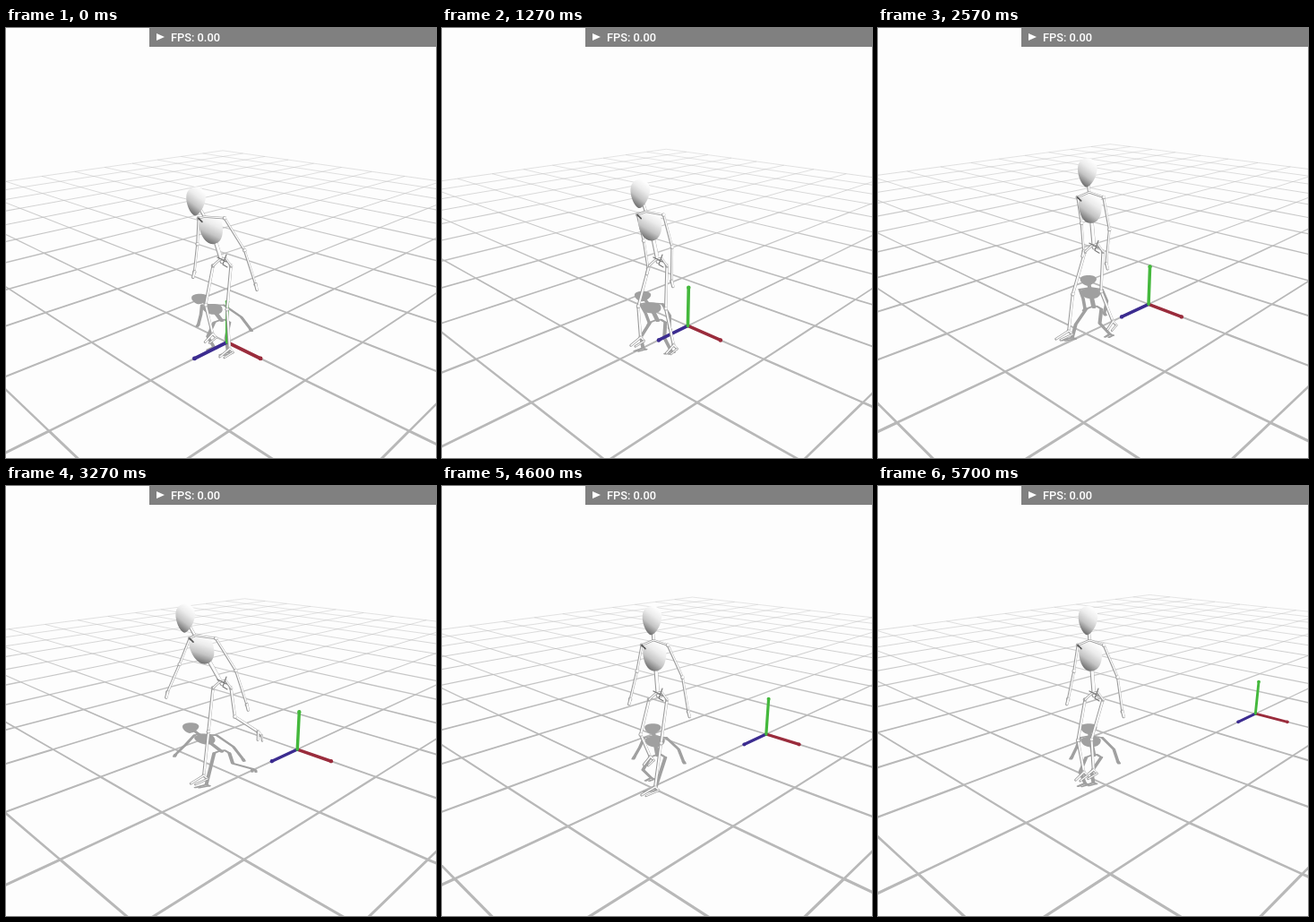
An HTML page with a canvas for the animation above (5730 ms loop, 480 by 480 pixels).

```html
<!DOCTYPE html>
<html lang="en">
<head>
<meta charset="utf-8">
<title>Walking skeleton viewer</title>
<style>
  html, body { margin: 0; width: 100%; height: 100%; overflow: hidden; background: #fdfdfd; }
  canvas { display: block; position: absolute; left: 0; top: 0; }
  .bar {
    position: absolute; left: 160px; top: 0; width: 320px; height: 20.5px;
    background: #808080; color: #fff;
    font: 500 12.8px/21px Roboto, "Open Sans", sans-serif;
  }
  .bar span { position: absolute; left: 24px; white-space: pre; }
  .bar i {
    position: absolute; left: 8px; top: 6px;
    border: solid transparent; border-width: 4.5px 0 4.5px 9px; border-left-color: #fff;
  }
</style>
</head>
<body>
<canvas id="view" width="480" height="480"></canvas>
<div class="bar"><i></i><span>FPS: 0.00</span></div>
<script>
const ctx = document.getElementById('view').getContext('2d');
const LOOP = 5730, MID = 240, FOCAL = 579.4;
const PITCH = Math.atan(0.327), SIN = Math.sin(PITCH), COS = Math.cos(PITCH);
const AXIS = 0.46, HALF = 10, STRIDE = 1.7, CONTACT = 5.82;

// Camera path over the floor while it follows the walker: seconds, x, z.
const PATH = [
  [0, 3.37, 3.46], [0.77, 3.36, 3.83], [1.77, 3.51, 4.01], [3.27, 3.29, 4.54],
  [4.03, 3.27, 4.6], [5.17, 3.31, 5.82], [5.7, 3.2, 6.38]
];

const lerp = (a, b, k) => a + (b - a) * k;
const ramp = (t, from, to) => {
  const k = Math.max(0, Math.min(1, (t - from) / (to - from)));
  return k * k * (3 - 2 * k);
};
const bump = (t, center, width) => Math.exp(-(((t - center) / width) ** 2));
const point = (x, y) => ({ x, y });
const shift = (p, x, y) => point(p.x + x, p.y + y);
const mix = (a, b, k) => point(lerp(a.x, b.x, k), lerp(a.y, b.y, k));

const rise = t => ramp(t, 1.8, 3.2);

function cameraAt(t) {
  let i = 1;
  while (i < PATH.length - 1 && t > PATH[i][0]) i++;
  const [t0, x0, z0] = PATH[i - 1], [t1, x1, z1] = PATH[i];
  const k = Math.min(1, (t - t0) / (t1 - t0));
  return { x: lerp(x0, x1, k), z: lerp(z0, z1, k), height: lerp(2.67, 2.4, rise(t)) };
}

function makeProjector(cam) {
  return (x, y, z) => {
    const dx = x - cam.x, dz = z - cam.z, dy = y - cam.height;
    const right = (dx - dz) * Math.SQRT1_2, ahead = -(dx + dz) * Math.SQRT1_2;
    const d = ahead * COS - dy * SIN, up = ahead * SIN + dy * COS;
    return { x: MID + FOCAL * right / d, y: MID - FOCAL * up / d, d };
  };
}

function line(points, color, width) {
  ctx.strokeStyle = color;
  ctx.lineWidth = width;
  ctx.beginPath();
  for (const p of points) ctx.lineTo(p.x, p.y);
  ctx.stroke();
}

function dot(p, radius, color) {
  ctx.fillStyle = color;
  ctx.beginPath();
  ctx.arc(p.x, p.y, radius, 0, 7);
  ctx.fill();
}

function drawGrid(project) {
  ctx.lineCap = 'butt';
  const segment = (a, b) => {
    if (a.d < 1 || b.d < 1) return;
    const d = (a.d + b.d) / 2;
    ctx.globalAlpha = Math.max(0.4, Math.min(1, 7 / d));
    line([a, b], '#b8b8b8', Math.max(0.9, 0.019 * FOCAL / d));
  };
  for (let i = -HALF; i <= HALF; i++)
    for (let j = -HALF; j < HALF; j++) {
      segment(project(i, 0, j), project(i, 0, j + 1));
      segment(project(j, 0, i), project(j + 1, 0, i));
    }
  ctx.globalAlpha = 1;
}

function drawAxes(project) {
  const origin = project(0, 0, 0), width = 0.036 * FOCAL / origin.d;
  const bar = (x, y, z, color) => {
    const tip = project(x * AXIS, y * AXIS, z * AXIS);
    line([origin, tip], color, width);
    dot(tip, width * 0.62, color);
  };
  ctx.lineCap = 'round';
  bar(1, 0, 0, '#9a2c3c');
  bar(0, 0, 1, '#3c2c90');
  bar(0, 1, 0, '#44b83c');
}

// The walk is driven by distance covered; a stoop and a lunge are laid over it.
function getPose(t, walked) {
  const late = rise(t), stoop = 1 - ramp(t, 0.8, 1.8), lunge = bump(t, 3.27, 0.35);
  const phase = 2 * Math.PI * (walked - CONTACT) / STRIDE;
  const reach = lerp(0.08, 0.24, late), swing = Math.cos(phase);
  const lean = 0.08 + 0.23 * stoop + 0.43 * lunge;
  const above = (p, length, angle) =>
    shift(p, -length * Math.sin(angle), -length * Math.cos(angle));

  const pelvis = point(241, lerp(261, 234, late) - 13 * lunge);
  const rib = above(pelvis, 44 - 6 * stoop, lean);
  const head = above(rib, 40 - 4 * stoop, lean + 0.2 * stoop);
  const ground = point(lerp(240, 235, late), lerp(352, 327, late));

  const leg = side => {
    const step = -side * reach * swing;
    const lift = Math.max(0, side * Math.sin(phase)) * reach;
    const kick = side > 0 ? lunge : 0;
    const hip = shift(pelvis, 10 * side, 4.5);
    const ankle = shift(ground,
      14 * side - 75 * step + 32 * kick, 4 * side + 33 * step - 85 * lift - 36 * kick);
    const half = Math.hypot(ankle.x - hip.x, ankle.y - hip.y) / 2;
    const bend = 0.4 * Math.sqrt(Math.max(0, 48 * 48 - half * half));
    const knee = shift(mix(hip, ankle, 0.5), -0.7 * bend, 0.5 * bend);
    const toe = shift(ankle, -12 + 0.45 * (ankle.x - knee.x), 9);
    return { hip, knee, ankle, toe };
  };
  const arm = side => {
    const shoulder = shift(rib, 14.5 * side, -12.5);
    const wrist = shift(shoulder,
      5 + 9 * side - 14 * side * swing + 21 * side * lunge + 10 * stoop, 67 + 7 * side);
    const elbow = shift(mix(shoulder, wrist, 0.5), 3 + 2 * side, -1);
    return { shoulder, elbow, wrist, side };
  };
  return {
    head, rib, pelvis, lean, floor: ground.y + 12,
    legs: [leg(1), leg(-1)], farArm: arm(-1), nearArm: arm(1)
  };
}

function egg(p, w, h, angle, blunt, shadow) {
  ctx.save();
  ctx.translate(p.x, p.y);
  ctx.rotate(angle);
  ctx.beginPath();
  ctx.moveTo(-w, -h * 0.3);
  ctx.bezierCurveTo(-w, -h * 1.25, w, -h * 1.25, w, -h * 0.3);
  ctx.bezierCurveTo(w, h * 0.35, w * blunt, h, 0, h);
  ctx.bezierCurveTo(-w * blunt, h, -w, h * 0.35, -w, -h * 0.3);
  const shade = ctx.createLinearGradient(-w * 0.9, h * 0.6, w * 0.5, -h * 0.8);
  shade.addColorStop(0, '#707070');
  shade.addColorStop(0.35, '#c4c4c4');
  shade.addColorStop(0.7, '#ececec');
  shade.addColorStop(1, '#fdfdfd');
  ctx.fillStyle = shadow || shade;
  ctx.fill();
  ctx.restore();
}

function drawBody(pose, shadow) {
  const { head, rib, pelvis, lean, farArm, nearArm } = pose;
  const bone = (width, ...points) => {
    line(points, shadow || '#999', shadow ? width + 1.5 : width);
    if (!shadow) line(points.map(q => shift(q, 0.4, -0.2)), '#fbfbfb', width - 1.3);
  };
  const limb = (width, ...points) => {
    bone(width, ...points);
    if (!shadow) for (const q of points) {
      dot(q, 2.2, '#a4a4a4');
      dot(shift(q, 0.5, -0.3), 1.6, '#fbfbfb');
    }
  };
  const drawArm = ({ shoulder, elbow, wrist, side }) => {
    limb(2.8, shoulder, elbow, wrist);
    bone(3.4, wrist, shift(wrist, 1.5 * side, 6));
  };
  const neck = mix(head, rib, 0.55);

  ctx.lineCap = ctx.lineJoin = 'round';
  for (const { hip, knee, ankle, toe } of pose.legs) {
    const heel = shift(ankle, 4, 4);
    limb(3.3, hip, knee, ankle);
    bone(2.8, heel, ankle, mix(ankle, toe, 0.55), toe);
    bone(2.4, heel, shift(toe, 5, 1));
  }
  drawArm(farArm);
  bone(4.5, mix(rib, pelvis, 0.3), pelvis);
  bone(2.6, pose.legs[1].hip, shift(pelvis, -3, -2), shift(pelvis, 4, -4), pose.legs[0].hip);
  if (!shadow) {
    line([shift(pelvis, -5, -5), shift(pelvis, 5, 0)], '#777', 1.3);
    line([shift(pelvis, 5, -8), shift(pelvis, 1, 3), shift(pelvis, 6, 6)], '#777', 1.1);
  }
  bone(3.4, head, neck, rib);
  egg(rib, 13, 16.5, -lean * 0.7, 0.7, shadow);
  bone(2.4, farArm.shoulder, neck, nearArm.shoulder);
  if (!shadow) line([farArm.shoulder, shift(farArm.shoulder, 4, 4)], '#555', 1.6);
  drawArm(nearArm);
  egg(head, 10.8, 16, 0.05, 0.35, shadow);
}

function draw(t) {
  const cam = cameraAt(t), project = makeProjector(cam), pose = getPose(t, cam.z);
  ctx.fillStyle = '#fdfdfd';
  ctx.fillRect(0, 0, 480, 480);
  drawGrid(project);

  // The shadow is the same body, flattened onto the floor.
  ctx.save();
  ctx.transform(0.85, 0, 0, 0.36, MID * 0.15, pose.floor * 0.64);
  drawBody(pose, '#a0a0a0');
  ctx.restore();

  drawAxes(project);
  drawBody(pose);
}

const start = performance.now();
function tick() {
  draw(((performance.now() - start) % LOOP) / 1000);
  requestAnimationFrame(tick);
}
tick();
</script>
</body>
</html>
```
